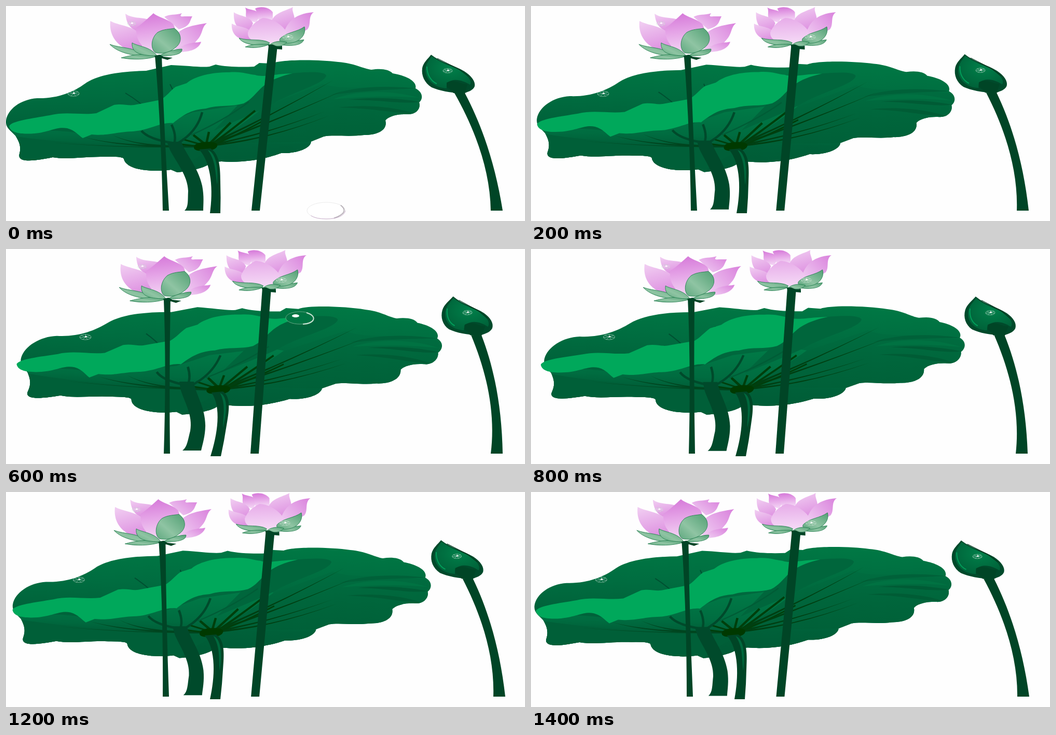
An HTML page that plays this animation: 1000x415 px, repeating every 1600 ms.

```html
<!DOCTYPE html>
<html lang="en">
<head>
<meta charset="utf-8">
<title>Lotus pond</title>
<style>
html, body { margin: 0; width: 100%; height: 100%; overflow: hidden; background: #fefefe; }
svg { display: block; width: 100vw; height: 100vh; }
</style>
</head>
<body>
<svg viewBox="0 0 1000 415">
  <defs>
    <linearGradient id="back" gradientUnits="userSpaceOnUse" x1="0" y1="104" x2="0" y2="230">
      <stop offset="0" stop-color="#007844"/><stop offset=".55" stop-color="#006d40"/><stop offset="1" stop-color="#00623a"/>
    </linearGradient>
    <linearGradient id="under" gradientUnits="userSpaceOnUse" x1="0" y1="190" x2="0" y2="320">
      <stop offset="0" stop-color="#007b47"/><stop offset=".45" stop-color="#006c40"/><stop offset=".6" stop-color="#006039"/><stop offset="1" stop-color="#005a35"/>
    </linearGradient>
    <linearGradient id="rightSide" gradientUnits="userSpaceOnUse" x1="0" y1="150" x2="0" y2="290">
      <stop offset="0" stop-color="#006d40"/><stop offset=".45" stop-color="#00653b"/><stop offset="1" stop-color="#005e37"/>
    </linearGradient>
    <linearGradient id="fall" x1=".4" y1="0" x2=".5" y2="1">
      <stop offset="0" stop-color="#d67ad9"/><stop offset=".45" stop-color="#e5a4e7"/><stop offset="1" stop-color="#f4d8f5"/>
    </linearGradient>
    <linearGradient id="soft" x1=".45" y1="0" x2=".5" y2="1">
      <stop offset="0" stop-color="#e7ace9"/><stop offset="1" stop-color="#f5daf6"/>
    </linearGradient>
    <linearGradient id="rise" x1=".3" y1="0" x2=".6" y2="1">
      <stop offset="0" stop-color="#f0cbf1"/><stop offset="1" stop-color="#dd8fe0"/>
    </linearGradient>
    <linearGradient id="far" x1="1" y1="0" x2="0" y2=".8">
      <stop offset="0" stop-color="#d981dc"/><stop offset="1" stop-color="#f0ccf2"/>
    </linearGradient>
    <linearGradient id="sepal" x1="0" y1="1" x2="1" y2="0">
      <stop offset="0" stop-color="#5fa87f"/><stop offset=".4" stop-color="#8fc4a3"/><stop offset="1" stop-color="#52a074"/>
    </linearGradient>
    <radialGradient id="bowl" cx=".55" cy=".35" r=".65">
      <stop offset="0" stop-color="#00804a"/><stop offset="1" stop-color="#006239"/>
    </radialGradient>
  </defs>
  <g id="leaf"></g>
  <g id="blade"></g>
  <g id="veins"></g>
  <g id="thickStem"></g>
  <g id="thinStem"></g>
  <g id="leafDew"></g>
  <g id="bead"></g>
  <g id="flowerA"></g>
  <g id="flowerB"></g>
  <g id="pod"></g>
  <g id="falling"></g>
</svg>
<script>
const part = id => document.getElementById(id);
const shape = (fill, d, extra = '') => `<path fill="${fill}" d="${d}" ${extra}/>`;
const line = (color, width, d) =>
  `<path fill="none" stroke="${color}" stroke-width="${width}" d="${d}"/>`;
const sepal = d => shape('url(#sepal)', d, 'stroke="#278052" stroke-width=".9"');

// A tapering rib from the hub, bent through a control point.
function vein(x, y, cx, cy, w, color = '#003f12') {
  return shape(color, `M386,${270 - w} Q${cx},${cy - w / 2} ${x},${y} Q${cx},${cy + w / 2} 386,${270 + w}Z`);
}

function dew(x, y, r = 10) {
  let rays = '';
  for (let i = 0; i < 7; i++) {
    const a = i * 0.9 + 0.25;
    rays += `M${x},${y}l${(r * Math.cos(a)).toFixed(1)},${(r * 0.5 * Math.sin(a)).toFixed(1)}`;
  }
  return `<ellipse cx="${x}" cy="${y}" rx="${r}" ry="${r * 0.47}" fill="none" stroke="#c4dccd" stroke-width=".6"/>` +
    line('#e9f3ec', 0.5, rays) +
    `<ellipse cx="${x + 1}" cy="${y - 1}" rx="2" ry="1.2" fill="#fff"/>`;
}

part('leaf').innerHTML =
  shape('url(#back)', `M0,222C2,200 28,180 60,178C100,179 130,166 152,150C175,133 220,126 270,125
    L318,114C350,115 375,119 392,117L404,113C425,118 455,118 478,117L488,110L512,111C530,103 600,103 640,108
    C670,110 688,121 704,123C722,120 738,122 745,130C770,134 793,145 789,159C805,167 803,181 796,186
    C800,198 790,210 774,209C750,208 735,215 731,221C736,240 715,249 690,249C660,253 630,248 612,252
    L587,262C587,275 560,285 530,284C500,295 460,303 415,300L395,302C388,311 360,318 330,321
    L318,316C285,321 232,318 227,295Q225,290 190,291C150,290 120,297 90,292C60,298 20,305 26,285
    C30,270 24,260 18,250C8,240-1,235 0,222Z`) +
  shape('url(#rightSide)', `M470,205L610,150C655,165 690,150 791,163C805,171 800,181 796,186C800,198 790,210 774,209
    C750,208 735,215 731,221C736,240 715,249 690,249C660,253 630,248 612,252L587,262C587,275 560,285 530,284
    C500,295 460,303 415,300L386,270Z`) +
  shape('url(#under)', `M8,240C90,240 120,240 150,248L300,228L360,205L470,188L500,192C480,210 440,240 400,265
    Q480,265 588,262C587,275 560,285 530,284C500,295 460,303 415,300L395,302C388,311 360,318 330,321
    L318,316C285,321 232,318 227,295Q225,290 190,291C150,290 120,297 90,292C60,298 20,305 26,285
    C30,270 24,260 18,250Z`) +
  shape('#005f38', 'M20,252C80,261 180,268 240,270L400,276Q350,300 330,321L318,316C285,321 232,318 227,295Q225,290 190,291C150,290 120,297 90,292C60,298 20,305 26,285C30,270 24,260 20,252Z') +
  shape('#006139', 'M625,172C675,153 740,154 790,159C755,161 700,162 625,172Z') +
  shape('#007242', 'M630,180C680,161 745,163 796,177C760,174 700,173 630,180Z') +
  shape('#005b35', 'M660,181C710,175 755,178 797,185C760,190 725,181 660,181Z') +
  shape('#005c35', 'M640,196C690,190 745,194 786,207C750,208 710,197 640,196Z') +
  line('#005031', 2, 'M230,168Q250,180 266,194M316,151L326,171');

part('blade').innerHTML =
  shape('#00663c', 'M445,193C470,163 500,138 550,130C585,127 613,126 617,134C614,151 550,166 510,191C480,207 445,221 400,241Z') +
  shape('#00a85b', `M6,232C10,222 50,217 84,211C115,203 145,211 174,207L208,191C225,188 235,193 247,191L298,181
    C310,174 316,164 327,156L348,149C365,135 395,128 430,128C455,126 466,132 480,133C495,138 510,132 552,130
    C522,137 505,146 493,157C482,167 474,180 458,188C435,195 410,190 385,198C360,200 345,207 322,226
    C300,223 275,240 245,242C210,243 198,251 165,248L148,255C139,249 133,240 118,236C98,232 85,243 55,246C27,248 9,245 6,232Z`);

const DARK = '#004a2b', STEM = '#004526';
part('veins').innerHTML =
  vein(631, 143, 510, 213, 2.5) + vein(650, 163, 510, 226, 2.5) +
  vein(613, 204, 500, 248, 2) + vein(622, 212, 500, 260, 2) +
  vein(90, 264, 250, 276, 1.5, '#004b25') + vein(150, 253, 230, 275, 2.5, '#00451f') +
  vein(205, 249, 260, 276, 2.5, '#00451f') +
  line('#003f0c', 4.5, 'M390,268L433,225M386,266L391,243M384,267L361,249') +
  line('#003f0c', 4, 'M396,267Q430,243 480,202') +
  line('#003f0c', 3, 'M400,268Q450,247 502,218M382,269L340,257M379,272L330,266') +
  line(DARK, 4.5, 'M319,264Q275,257 261,241M324,266Q329,250 319,229M329,266Q368,244 378,205') +
  line('#005c36', 2.5, 'M357,249Q420,221 468,185') +
  shape('#003900', 'M363,270C365,262 402,259 407,267C409,276 394,281 379,279C367,281 359,276 363,270Z');

part('thickStem').innerHTML =
  shape(DARK, `M310,262L338,262C345,285 370,310 378,347C382,368 380,382 380,395L344,395
    C352,388 350,374 351,357C350,327 329,303 316,278Z`);

part('thinStem').innerHTML =
  shape(STEM, 'M372,277L394,275C410,285 413,306 413,340Q414,370 413,400L393,400C399,358 397,304 372,277Z') +
  shape('#00683d', 'M389,278C401,282 410,303 407,345C403,324 405,300 389,278Z');

part('leafDew').innerHTML = dew(130, 169, 11);

part('bead').innerHTML =
  `<ellipse cx="566" cy="133" rx="27" ry="12" fill="#007543" stroke="#69a886" stroke-width="1"/>` +
  line('#c8e2d2', 2, 'M579,123C600,129 596,144 572,145') +
  `<ellipse cx="558" cy="129" rx="7" ry="3" fill="#fff"/>`;

part('flowerA').innerHTML =
  shape(STEM, 'M287,96L300,96Q305,250 314,395L302,395Q299,230 287,96Z') +
  shape('url(#rise)', 'M230,15C244,25 263,21 277,27L253,49C237,42 232,32 230,15Z') +
  shape('url(#far)', 'M305,21C315,15 326,18 339,14C335,19 335,21 343,20L359,20C353,30 356,39 333,45Z') +
  shape('url(#rise)', 'M201,29C218,38 243,38 257,53L264,84L247,88C215,80 198,58 201,29Z') +
  shape('url(#far)', 'M387,33C376,42 380,54 368,66C357,80 342,88 328,89L322,66C330,40 365,37 387,33Z') +
  shape('url(#far)', 'M376,69C365,72 350,68 330,84L332,89C355,89 372,83 376,69Z') +
  shape('url(#fall)', 'M284,14C293,22 310,24 321,34C330,43 327,67 316,83L289,92C262,84 249,65 251,42C262,35 274,23 284,14Z') +
  sepal('M200,74C222,82 247,79 260,93L285,96C250,99 216,91 200,74Z') +
  sepal('M222,100C240,95 265,90 291,97C270,104 242,104 222,100Z') +
  sepal('M243,71C254,78 278,78 291,96C264,96 241,93 243,71Z') +
  sepal('M339,83C341,94 318,97 295,96C305,90 325,83 339,83Z') +
  sepal('M324,43C338,52 339,67 331,76C320,88 302,94 288,90C278,83 279,62 292,51C304,44 316,45 324,43Z') +
  shape(STEM, 'M286,96L296,94L304,98L321,100L311,104L301,101L289,102Z') +
  dew(242, 34, 8);

part('flowerB').innerHTML =
  shape(STEM, 'M506,77L523,77L489,395L473,395Z') +
  shape('url(#fall)', 'M461,3C470,9 483,5 490,18L482,32L465,27C459,18 465,12 461,3Z') +
  shape('url(#fall)', 'M480,5C490,0 507,2 514,12L514,28L487,28Q484,12 480,5Z') +
  shape('url(#rise)', 'M439,12C449,20 468,18 476,33L468,53C445,45 438,35 439,12Z') +
  shape('url(#rise)', 'M553,2C549,10 560,21 554,32L538,50L511,33C514,13 538,10 553,2Z') +
  shape('url(#rise)', 'M435,34C450,42 470,39 476,56L477,67C449,69 433,55 435,34Z') +
  shape('url(#far)', 'M593,12C581,20 589,35 581,45L548,64L532,61C540,34 552,15 593,12Z') +
  shape('url(#soft)', 'M495,23C511,23 531,35 540,49C540,62 528,71 505,72C478,71 465,65 466,51C471,38 483,28 495,23Z') +
  sepal('M449,62C468,68 493,62 508,71C506,78 459,79 449,62Z') +
  sepal('M461,79C475,73 493,73 508,74C493,80 478,82 461,79Z') +
  sepal('M574,65C570,76 551,78 530,75C544,65 560,68 574,65Z') +
  sepal('M575,40C579,56 566,70 545,72C532,73 525,69 528,63C541,50 560,51 575,40Z') +
  sepal('M507,76C514,68 531,66 541,70C536,78 520,79 507,76Z') +
  shape(STEM, 'M505,75L513,74L522,78L532,77L532,84L521,83L507,82Z') +
  dew(543, 60, 10);

part('pod').innerHTML =
  shape(STEM, 'M864,168L884,168C918,232 943,307 957,395L934,395C933,316 903,237 864,168Z') +
  shape(DARK, 'M819,94C840,110 863,114 883,126C897,135 905,146 903,155C900,163 891,165 884,168C862,169 836,164 820,157C806,148 800,134 802,120C804,109 813,102 819,94Z') +
  shape('url(#bowl)', 'M820,97C842,113 865,117 881,128C893,137 898,147 894,152C880,143 862,138 849,149L849,159C828,158 810,146 808,125C808,111 815,106 820,97Z') +
  line('#009d59', 2, 'M811,117C811,133 819,145 830,150') +
  line('#002f18', 1, 'M831,101L871,121L891,136') +
  shape(STEM, 'M849,148C858,142 870,146 880,150L889,151L884,170L862,168Q854,158 849,157Z') +
  dew(851, 125, 9);

// One entry per step: [sway, second blossom's sway, drift of the pod's foot, drift of the other feet].
const STEP = 200;
const poses = [
  [0, 0, 0, 0], [.39, .38, 2, 3], [.65, .64, 1, 3], [1, 1, 0, 1],
  [.89, 1, 0, 1], [.67, .66, 3, 1], [.45, .45, 5, 0], [.23, .28, 3, -1]
];
const drops = { 0: [617, 395, 37, 16], 2: [686, 351, 41, 18] };

function transform(id, ...m) {
  part(id).setAttribute('transform', `matrix(${m.join(' ')})`);
}

// Shears a part so that its top and foot heights move sideways by the given amounts.
function lean(id, top, topShift, foot, footShift, stretch = 1, lift = 0) {
  const k = (footShift - topShift) / (foot - top);
  transform(id, 1, 0, k, stretch, footShift - k * foot, foot * (1 - stretch) - lift);
}

function drawDrop(drop) {
  if (!drop) return '';
  const [x, y, rx, ry] = drop;
  return `<ellipse cx="${x}" cy="${y}" rx="${rx}" ry="${ry}" fill="#fff" stroke="#e2e2e2" stroke-width=".7"/>` +
    line('#b4aeb5', 1.8, `M${x + rx * .75},${y - ry * .65}Q${x + rx * 1.25},${y + ry * .2} ${x + rx * .4},${y + ry * .92}`) +
    line('#c7a9c9', .9, `M${x + rx},${y}Q${x + rx * .85},${y + ry} ${x},${y + ry}Q${x - rx * .55},${y + ry} ${x - rx * .8},${y + ry * .6}`);
}

let shown = -1;
function render(now) {
  const step = Math.floor(now / STEP) % poses.length;
  if (step !== shown) {
    shown = step;
    const [s, b, podFoot, drift] = poses[step];
    transform('leaf', 1, .033 * s, -.2 * s, 1, 73.6 * s, -12.2 * s);
    transform('veins', 1, .033 * s, -.16 * s, 1, 68 * s, -12.2 * s);
    transform('blade', 1, .02 * s, -.08 * s, 1, 33 * s, -10 * s);
    lean('thickStem', 262, 24 * s, 395, drift - 5 * s, 1, 6 * s);
    lean('thinStem', 275, 24 * s, 400, drift);
    transform('leafDew', 1, 0, 0, 1, 23 * s, s);
    lean('flowerA', 14, 21 * s, 395, 2 * drift);
    lean('flowerB', 10, -14.3 * b, 395, -2 * b);
    lean('pod', 94, 42.5 * s, 395, podFoot, 1 + .008 * s);
    part('bead').style.display = step === 3 ? '' : 'none';
    part('falling').innerHTML = drawDrop(drops[step]);
  }
  requestAnimationFrame(tick);
}

const start = performance.now();
function tick() { render(performance.now() - start); }
tick();
</script>
</body>
</html>
```
